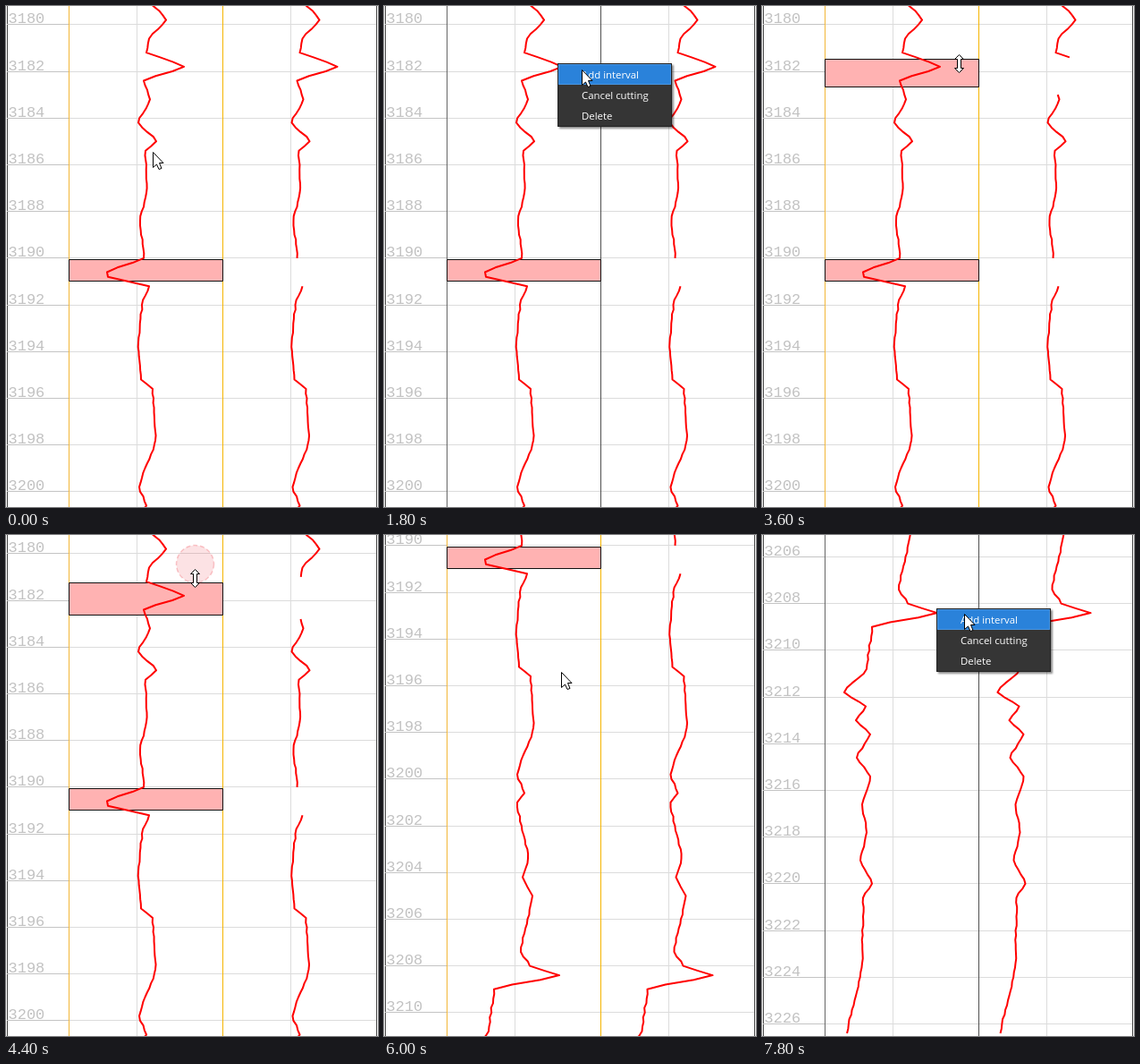
An HTML page with a canvas that plays this animation: 416x560 px, repeating every 8000 ms.

```html
<!DOCTYPE html>
<html lang="en">
<head>
<meta charset="utf-8">
<title>Curve cutting</title>
<style>
  html, body { margin: 0; width: 100%; height: 100%; overflow: hidden; background: #fff; }
  canvas { display: block; }
</style>
</head>
<body>
<canvas id="stage" width="416" height="560"></canvas>
<script>
const ctx = document.getElementById('stage').getContext('2d');
const W = 416, H = 560, LOOP = 8000, TICK = 200;
const LEFT = 70.5, MID = 242.5, TRACK = 171.5;
const TOP = 20.85, METRE = 26.1, SAMPLE = METRE / 5;

// Turning points of the log: sample number and value.
const turns = [
  [-5, 162], [-1, 179], [3, 160], [6, 157], [8, 187], [9, 199], [12, 154], [16, 161],
  [21, 148], [25, 168], [27, 156], [36, 157], [42, 150], [50, 154], [53, 113], [54, 114],
  [56, 160], [60, 152], [68, 148], [76, 151], [78, 164], [89, 167], [99, 149], [103, 157],
  [105, 149], [117, 161], [121, 155], [125, 166], [137, 153], [140, 163], [142, 196],
  [145, 123], [154, 117], [159, 92], [162, 116], [165, 105], [168, 121], [173, 106],
  [177, 121], [183, 112], [189, 117], [195, 110], [200, 123], [203, 113], [217, 112],
  [233, 95]
];

const moves = [
  { start: 0, end: 800, x: 194, y: 65 },
  { start: 1200, end: 2200, x: 239, y: 75 },
  { start: 3200, end: 3800, x: 211, y: 59 },
  { start: 4000, end: 4400, x: 211, y: 48 },
  { start: 4400, end: 5200, x: 214, y: 90 },
  { start: 5200, end: 5800, x: 198, y: 153 },
  { start: 6400, end: 7000, x: 195, y: 83 },
  { start: 7400, end: 7800, x: 226, y: 88 }
];

const BLUE = '0,0,230', RED = '230,0,20';
const rightClicks = [
  { start: 830, x: 194, y: 64, rgb: BLUE, picked: 3000, placed: 3200 },
  { start: 7030, x: 195, y: 82, rgb: BLUE, picked: LOOP, placed: LOOP }
];
const ripples = [
  ...rightClicks,
  { start: 3000, x: 238, y: 75, rgb: RED },
  { start: 4060, x: 211, y: 32, rgb: RED }
];

const clamp = v => Math.min(1, Math.max(0, v));
const mix = (a, b, s) => a + (b - a) * s;

function seeded(seed) {
  return () => (seed = seed * 16807 % 2147483647) / 2147483647;
}

function buildCurve() {
  const random = seeded(7), points = [];
  turns.slice(1).forEach(([k1, x1], i) => {
    const [k0, x0] = turns[i];
    for (let k = k0; k < k1; k++) {
      const s = (k - k0) / (k1 - k0), eased = mix(s, s * s * (3 - 2 * s), 0.6);
      const rough = k === k0 ? 0 : (random() - 0.5) * 1.6;
      points.push([TOP + k * SAMPLE, mix(x0, x1, eased) + rough]);
    }
  });
  return points;
}
const curve = buildCurve();

function line(x0, y0, x1, y1, color) {
  ctx.strokeStyle = color;
  ctx.lineWidth = 1;
  ctx.beginPath();
  ctx.moveTo(x0, y0);
  ctx.lineTo(x1, y1);
  ctx.stroke();
}

function pointerAt(t) {
  let x = 164, y = 163;
  for (const m of moves) {
    const s = clamp((t - m.start) / (m.end - m.start));
    x = mix(x, m.x, s);
    y = mix(y, m.y, s);
  }
  return [Math.round(x), Math.round(y)];
}

// The wheel speeds up: five notches within a second.
const scrollAt = t => 135 * Math.round(5 * clamp((t - 5400) / 1000) ** 1.8);

function intervalsAt(t) {
  const list = [[283, 308]];
  if (t >= 3200) list.unshift(t < 4200 ? [59, 91] : [53, 90]);
  return list;
}

function drawGrid(scroll, active) {
  line(1.5, 0, 1.5, H, '#444');
  line(414.5, 0, 414.5, H, '#444');
  ctx.font = '17px "Liberation Mono", monospace';
  ctx.fillStyle = '#c2c2c2';
  for (let depth = 3180; depth <= 3228; depth += 2) {
    const y = Math.floor(TOP + (depth - 3180) * METRE - scroll) + 0.5;
    if (y < -2 || y > H + 16) continue;
    line(1, y, LEFT, y, '#c4c4c4');
    line(LEFT, y, 414, y, '#dcdcdc');
    ctx.fillText(depth, 2.5, y - 1.5);
  }
  for (const x of [146.5, 318.5]) line(x, 0, x, H, '#dcdcdc');
  line(LEFT, 0, LEFT, H, active ? '#f2b637' : '#666');
  line(MID, 0, MID, H, active ? '#f5b400' : '#505050');
}

function drawCurve(dx, scroll, gaps) {
  const hidden = y => gaps.some(([top, bottom]) => y > top - 1 && y < bottom + 3);
  ctx.strokeStyle = '#f00';
  ctx.lineWidth = 2;
  ctx.lineJoin = 'round';
  ctx.beginPath();
  let pen = false;
  for (const [y, x] of curve) {
    const shown = !hidden(y);
    if (shown) ctx[pen ? 'lineTo' : 'moveTo'](x + dx, y - scroll);
    pen = shown;
  }
  ctx.stroke();
}

function drawIntervals(list, scroll) {
  ctx.lineWidth = 1;
  ctx.fillStyle = '#ffb2b2';
  ctx.strokeStyle = '#111';
  for (const [top, bottom] of list) {
    const box = [LEFT, top - scroll + 0.5, MID - LEFT, bottom - top - 1];
    ctx.fillRect(...box);
    ctx.strokeRect(...box);
  }
}

function drawRipple({ start, x, y, rgb }, t) {
  const age = t - start;
  if (age < 0 || age >= 400) return;
  const fade = 1 - age / 400;
  ctx.beginPath();
  ctx.arc(x + 0.5, y + 0.5, 4 + age * 0.05, 0, Math.PI * 2);
  ctx.fillStyle = `rgba(${rgb},${0.1 + 0.6 * fade * fade})`;
  ctx.fill();
  ctx.strokeStyle = `rgba(${rgb},${0.12 + 0.6 * fade})`;
  ctx.lineWidth = 1.5;
  ctx.setLineDash([5, 3]);
  ctx.stroke();
  ctx.setLineDash([]);
}

function drawMenu({ start, picked, x, y }, t, px, py) {
  if (t < start || t >= picked) return;
  ctx.save();
  ctx.globalAlpha = clamp((t - start) / 190);
  ctx.shadowColor = 'rgba(0,0,0,.45)';
  ctx.shadowBlur = 2;
  ctx.shadowOffsetX = ctx.shadowOffsetY = 2;
  ctx.fillStyle = '#353535';
  ctx.fillRect(x, y, 128, 71);
  ctx.shadowColor = 'transparent';
  ctx.lineWidth = 1;
  ctx.strokeStyle = '#222';
  ctx.strokeRect(x + 0.5, y + 0.5, 127, 70);
  ctx.font = '500 11.4px "Open Sans", sans-serif';
  ['Add interval', 'Cancel cutting', 'Delete'].forEach((label, i) => {
    const top = y + 1 + i * 23;
    if (px > x + 1 && py > top && py <= top + 23) {
      ctx.fillStyle = '#2a82da';
      ctx.fillRect(x + 1, top, 126, 23);
      ctx.strokeStyle = '#4a95e0';
      ctx.strokeRect(x + 1.5, top + 0.5, 125, 22);
    }
    ctx.fillStyle = '#fff';
    ctx.fillText(label, x + 27, top + 16);
  });
  ctx.restore();
}

function drawPointer(x, y, resize) {
  const outline = resize
    ? 'M0-10L5-5H2V5H5L0 10L-5 5H-2V-5H-5Z'
    : 'M0 0V17L4 13.5L6.5 19L9.5 18L7 12H11.5Z';
  const shape = new Path2D(outline);
  ctx.save();
  ctx.translate(x + 0.5, y + 0.5);
  ctx.fillStyle = '#fff';
  ctx.fill(shape);
  ctx.strokeStyle = '#000';
  ctx.lineWidth = 1;
  ctx.lineJoin = 'miter';
  ctx.stroke(shape);
  ctx.restore();
}

function draw(t) {
  const scroll = scrollAt(t), intervals = intervalsAt(t), [px, py] = pointerAt(t);
  const active = !rightClicks.some(c => t >= c.start && t < c.placed);
  const onEdge = intervals.flat().some(y => Math.abs(y - scroll - py) <= 5);
  ctx.fillStyle = '#fff';
  ctx.fillRect(0, 0, W, H);
  drawGrid(scroll, active);
  drawIntervals(intervals, scroll);
  drawCurve(0, scroll, []);
  drawCurve(TRACK, scroll, intervals);
  ripples.forEach(r => drawRipple(r, t));
  rightClicks.forEach(c => drawMenu(c, t, px, py));
  drawPointer(px, py, onEdge);
}

const origin = performance.now();
function tick() {
  const t = (performance.now() - origin) % LOOP;
  draw(Math.floor(t / TICK) * TICK);
  requestAnimationFrame(tick);
}
tick();
</script>
</body>
</html>
```
